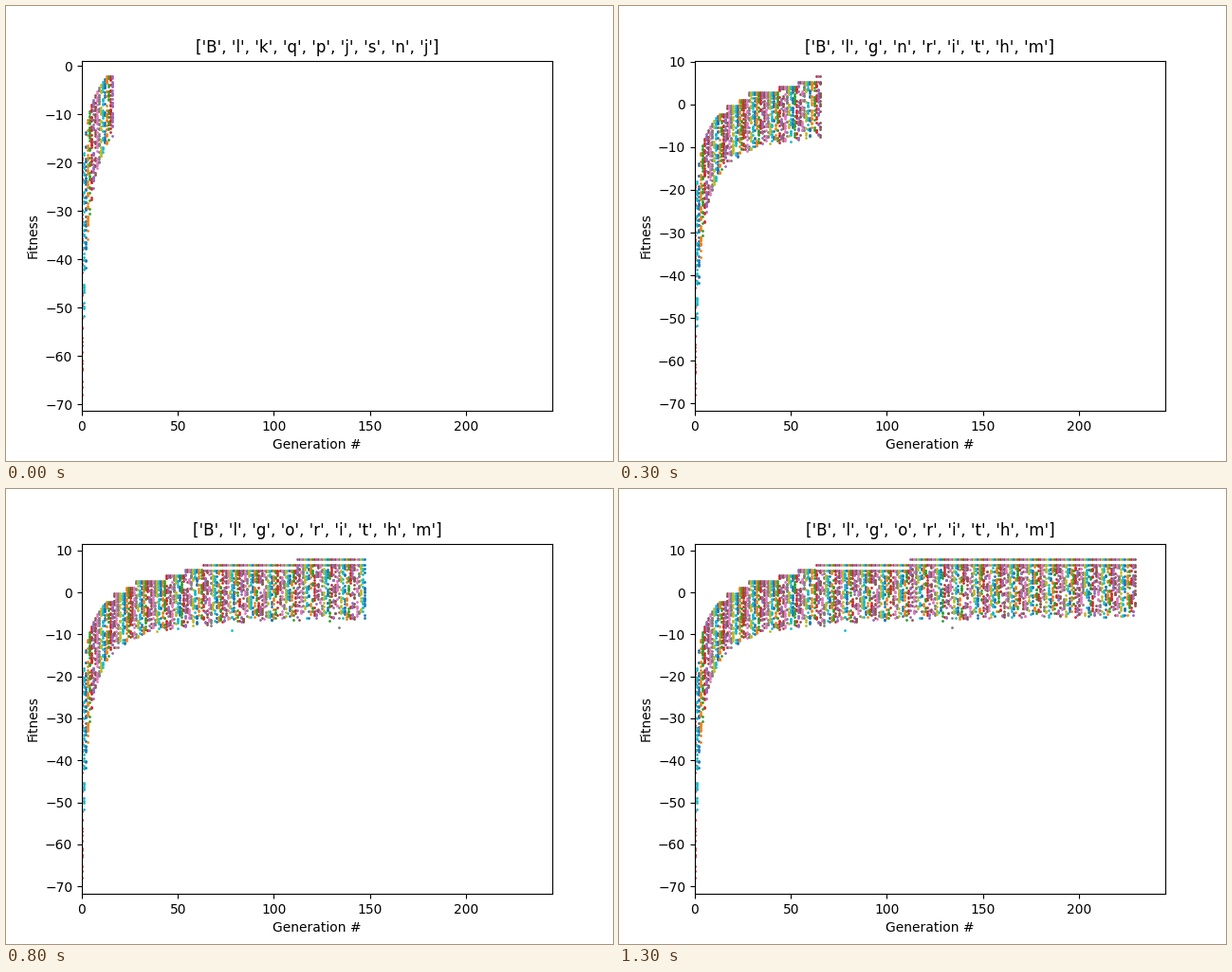
A matplotlib script for the animation above (1.4 s loop, 640 by 480 pixels).

```python
import numpy as np
import matplotlib.pyplot as plt
from matplotlib.animation import FuncAnimation

FRAMES = 14
GENS_PER_FRAME = 16.4
WORST = -68.04
# Late breakthroughs: (generation, best fitness from then on)
BREAKTHROUGHS = [(13, -2.2), (17, -0.2), (23, 1.1), (28, 2.8),
                 (44, 4.2), (54, 5.4), (63, 6.55), (112, 7.85)]
TITLES = ["Blkqpjsnj", "Blhnqithl", "Blgnqithl"] + ["Blgnrithm"] * 3 + ["Blgorithm"]


def best(gen):
    reached = [level for start, level in BREAKTHROUGHS if gen >= start]
    return reached[-1] if reached else -18 + 6.16 * np.log(max(gen, 0.85))


def floor(gen):
    return -5 + (WORST + 5) / (1 + 0.35 * gen)


def population(gen):
    rng = np.random.RandomState(1000 + gen)
    top, low = best(gen), floor(gen)
    second = top - (1.3 if gen >= 63 else 0.4)
    count = int(16 + 30 / (1 + gen / 8))
    scores = [top, second, *(second - (second - low) * rng.beta(1, 1.2, count))]
    if gen == 0:
        scores.append(WORST)
    elif rng.rand() < 0.05:
        scores.append(low - rng.exponential(1.2))
    return scores


def color(gen):
    return "C3" if gen == 0 else f"C{(int(gen * 1.039) + 8) % 10}"


def last_gen(frame):
    return int(GENS_PER_FRAME * (frame + 1))


fig, ax = plt.subplots(figsize=(6.4, 4.8), dpi=100)
ax.set_xlim(0, 245)
ax.set_xlabel("Generation #")
ax.set_ylabel("Fitness")

columns = []
for gen in range(last_gen(FRAMES - 1) + 1):
    scores = population(gen)
    columns += ax.plot([gen] * len(scores), scores, "o", ms=1, color=color(gen))


def update(frame):
    newest = last_gen(frame)
    for gen, column in enumerate(columns):
        column.set_visible(gen <= newest)
    margin = 0.05 * (best(newest) - WORST)
    ax.set_ylim(WORST - margin, best(newest) + margin)
    ax.set_title(str(list(TITLES[min(frame, len(TITLES) - 1)])))
    return columns


anim = FuncAnimation(fig, update, frames=FRAMES, interval=100, repeat=True,
                     repeat_delay=0, blit=False)
plt.show()
```
